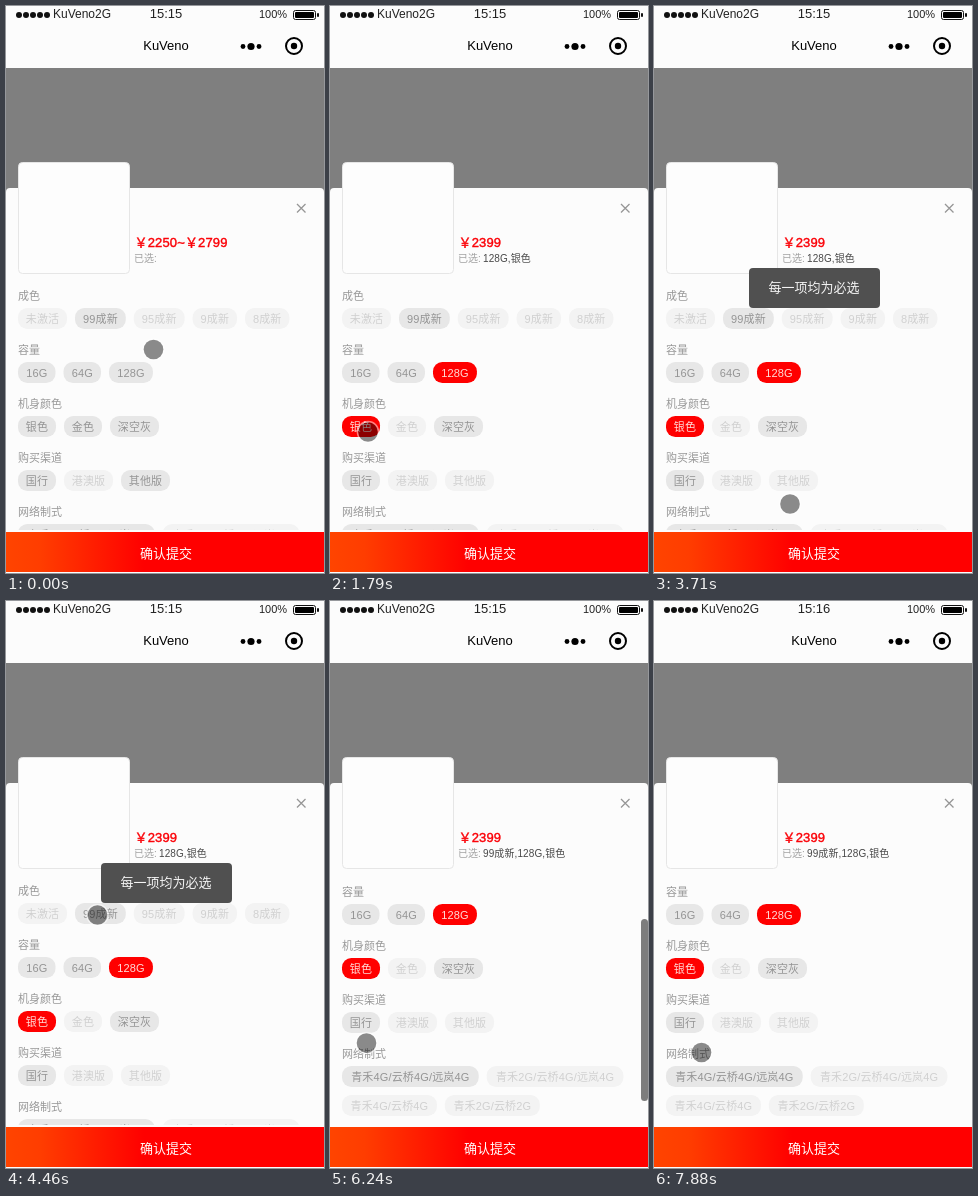
An HTML page that plays this animation: 318 px wide and 567 px high, repeating every 8 s.

```html
<!DOCTYPE html>
<html lang="zh-CN">
<head>
<meta charset="utf-8">
<style>
html, body { margin: 0; width: 100%; height: 100%; overflow: hidden; background: #fcfcfc; }
svg { display: block; width: 318px; height: 567px; }
text { font-family: "Liberation Sans", "Noto Sans CJK SC", "Noto Sans CJK", sans-serif; white-space: pre; }
.mid { text-anchor: middle; }
.price { font-size: 13px; letter-spacing: .15px; fill: #fb0007; stroke: #fb0007; stroke-width: .4px; }
.label { font-size: 11px; fill: #989898; }
.pill text { font-size: 11px; letter-spacing: .15px; text-anchor: middle; }
.on rect { fill: #e7e7e7; } .on text { fill: #949494; }
.off rect { fill: #f3f3f3; } .off text { fill: #d0d0d0; }
.picked rect { fill: #ff0000; } .picked text { fill: #ffdcd8; }
</style>
</head>
<body>
<svg id="stage" viewBox="0 0 318 567" width="318" height="567">
  <defs>
    <clipPath id="list"><rect y="278" width="318" height="246"/></clipPath>
    <linearGradient id="bar" gradientUnits="userSpaceOnUse" x1="0" y1="0" x2="138" y2="0">
      <stop offset="0" stop-color="#ff4400"/><stop offset=".25" stop-color="#ff3d00"/><stop offset="1" stop-color="#ff0000"/>
    </linearGradient>
  </defs>
  <rect width="318" height="567" fill="#fcfcfc"/>
  <g id="signal"></g>
  <text x="47" y="12" font-size="12" fill="#222">KuVeno2G</text>
  <text id="clock" class="mid" x="160" y="12" font-size="13" fill="#222"></text>
  <text x="253" y="12" font-size="11" fill="#222">100%</text>
  <rect x="287.5" y="4.5" width="22" height="9" rx="2" fill="none" stroke="#111"/>
  <rect x="289" y="6" width="19" height="6" rx="1" fill="#000"/>
  <rect x="311" y="7" width="2" height="4" rx="1" fill="#111"/>
  <text class="mid" x="160" y="44" font-size="13">KuVeno</text>
  <circle cx="237" cy="40.5" r="2.4"/><circle cx="245" cy="40.5" r="3.6"/><circle cx="253" cy="40.5" r="2.4"/>
  <circle cx="288" cy="40" r="8" fill="none" stroke="#000" stroke-width="2"/><circle cx="288" cy="40" r="3.2"/>

  <rect y="62" width="318" height="126" fill="#7f7f7f"/>
  <path d="M0 567V186q0-4 4-4H314q4 0 4 4V567z" fill="#fcfcfc"/>
  <rect x="12.5" y="156.5" width="111" height="111" rx="4" fill="#fdfdfd" stroke="#e6e6e6"/>
  <path d="M291 198l8.5 8.5m0-8.5l-8.5 8.5" stroke="#969696" stroke-width="1.3"/>
  <text id="price" class="price" x="128.5" y="241"></text>
  <text x="128" y="256" font-size="10" fill="#a0a0a0">已选:</text>
  <text id="chosen" x="153" y="256" font-size="10" letter-spacing=".1" fill="#484848"></text>

  <g clip-path="url(#list)"><g id="options"></g></g>
  <rect id="thumb" x="311" width="7" height="182" rx="3.5" fill="#7d7d7d"/>
  <rect y="526" width="318" height="40" fill="url(#bar)"/>
  <text class="mid" x="160" y="551.6" font-size="13" font-weight="500" fill="#fff">确认提交</text>
  <g id="toast">
    <rect x="95" y="262" width="131" height="40" rx="4" fill="#505050"/>
    <text class="mid" x="160" y="286" font-size="13" fill="#f4f4f4">每一项均为必选</text>
  </g>
  <g id="touch">
    <circle r="10.5" fill="none" stroke="#fff" stroke-opacity=".5" stroke-width="1.6"/>
    <circle r="9.8" fill="#000" fill-opacity=".45"/>
  </g>
</svg>
<script>
const LOOP = 8000, TICK = 148.7;
const $ = id => document.getElementById(id);
const NS = "http://www.w3.org/2000/svg";

function add(parent, tag, attrs, text) {
  const el = document.createElementNS(NS, tag);
  for (const k in attrs) el.setAttribute(k, attrs[k]);
  if (text) el.textContent = text;
  return parent.appendChild(el);
}

for (let i = 0; i < 5; i++) add($("signal"), "circle", { cx: 13 + i * 7, cy: 9, r: 3, fill: "#111" });

// A leading "-" marks an option that is never available.
const groups = [
  ["成色", "-未激活 99成新 -95成新 -9成新 -8成新"],
  ["容量", "16G 64G 128G"],
  ["机身颜色", "银色 金色 深空灰"],
  ["购买渠道", "国行 -港澳版 其他版"],
  ["网络制式", "青禾4G/云桥4G/远岚4G -青禾2G/云桥4G/远岚4G|-青禾4G/云桥4G -青禾2G/云桥2G"]
];
const pills = {};

const charWidth = c => /\d/.test(c) ? 6.4 : c === "G" ? 8.7 : c === "/" ? 4.7 : 11;
const pillWidth = s => 16 + [...s].reduce((sum, c) => sum + charWidth(c), 0);

groups.forEach(([label, rows], i) => {
  const top = 290 + i * 54;
  add($("options"), "text", { class: "label", x: 12, y: top + 4.3 }, label);
  rows.split("|").forEach((row, r) => {
    let x = 12;
    const y = top + 12 + r * 29;
    for (const item of row.split(" ")) {
      const name = item.replace("-", ""), w = pillWidth(name);
      const g = add($("options"), "g", { class: item === name ? "pill on" : "pill off" });
      add(g, "rect", { x, y, width: w, height: 21, rx: 9.3 });
      add(g, "text", { x: x + w / 2, y: y + 15 }, name);
      pills[name] = g;
      x += w + 8;
    }
  });
});

// Touch path: tick, x, y
const path = [
  [0, 147.5, 343.5], [4, 125, 367], [6, 125, 367], [11, 38, 426], [13, 38, 426],
  [14, 48, 370], [15, 83, 324], [16, 57, 340], [17, 57, 340], [19, 80, 410],
  [20, 109.5, 536], [21, 122, 556], [23, 130, 540], [25, 136, 498], [29, 91, 308],
  [30, 91.5, 314], [34, 91.5, 314], [37, 107.5, 434], [38, 98, 480], [39, 85, 480],
  [41, 40, 440], [42, 36.5, 442], [45, 36, 430], [46, 36, 430], [48, 36, 425],
  [52, 36, 425], [53, 47.5, 451.5]
];
const scrollKeys = [[38, 0], [39, 8], [40, 28], [41, 47], [42, 53]];
const thumbKeys = [[38, 0], [39, 1], [42, 1], [45, 0]];

// Linear interpolation through keys, held beyond both ends
function at(keys, n, k = 1) {
  const i = keys.findIndex(key => key[0] >= n);
  if (i < 0) return keys[keys.length - 1][k];
  if (i === 0) return keys[0][k];
  const a = keys[i - 1], b = keys[i];
  return a[k] + (b[k] - a[k]) * (n - a[0]) / (b[0] - a[0]);
}

const setClass = (name, cls) => pills[name].setAttribute("class", "pill " + cls);

function render(t) {
  // The screen refreshes in discrete ticks.
  const n = Math.floor((t + 8) / TICK);
  const size = n >= 4, color = n >= 12, grade = n >= 33;

  setClass("128G", size ? "picked" : "on");
  setClass("金色", size ? "off" : "on");
  setClass("其他版", size ? "off" : "on");
  setClass("银色", color ? "picked" : "on");
  setClass("99成新", grade ? "picked" : "on");

  $("price").textContent = color ? "￥2399" : size ? "￥2399~￥2450" : "￥2250~￥2799";
  $("chosen").textContent = [grade && "99成新", size && "128G", color && "银色"].filter(Boolean).join(",");
  $("clock").textContent = n < 44 ? "15:15" : "15:16";

  const scroll = at(scrollKeys, n);
  $("options").setAttribute("transform", `translate(0 ${-scroll})`);
  $("thumb").setAttribute("y", 284 + scroll * 34 / 53);
  $("thumb").setAttribute("opacity", at(thumbKeys, n));
  $("toast").setAttribute("visibility", n >= 23 && n < 33 ? "visible" : "hidden");
  $("touch").setAttribute("transform", `translate(${at(path, n)} ${at(path, n, 2)})`);
}

const start = performance.now();
function loop() {
  render((performance.now() - start) % LOOP);
  requestAnimationFrame(loop);
}
loop();
</script>
</body>
</html>
```
